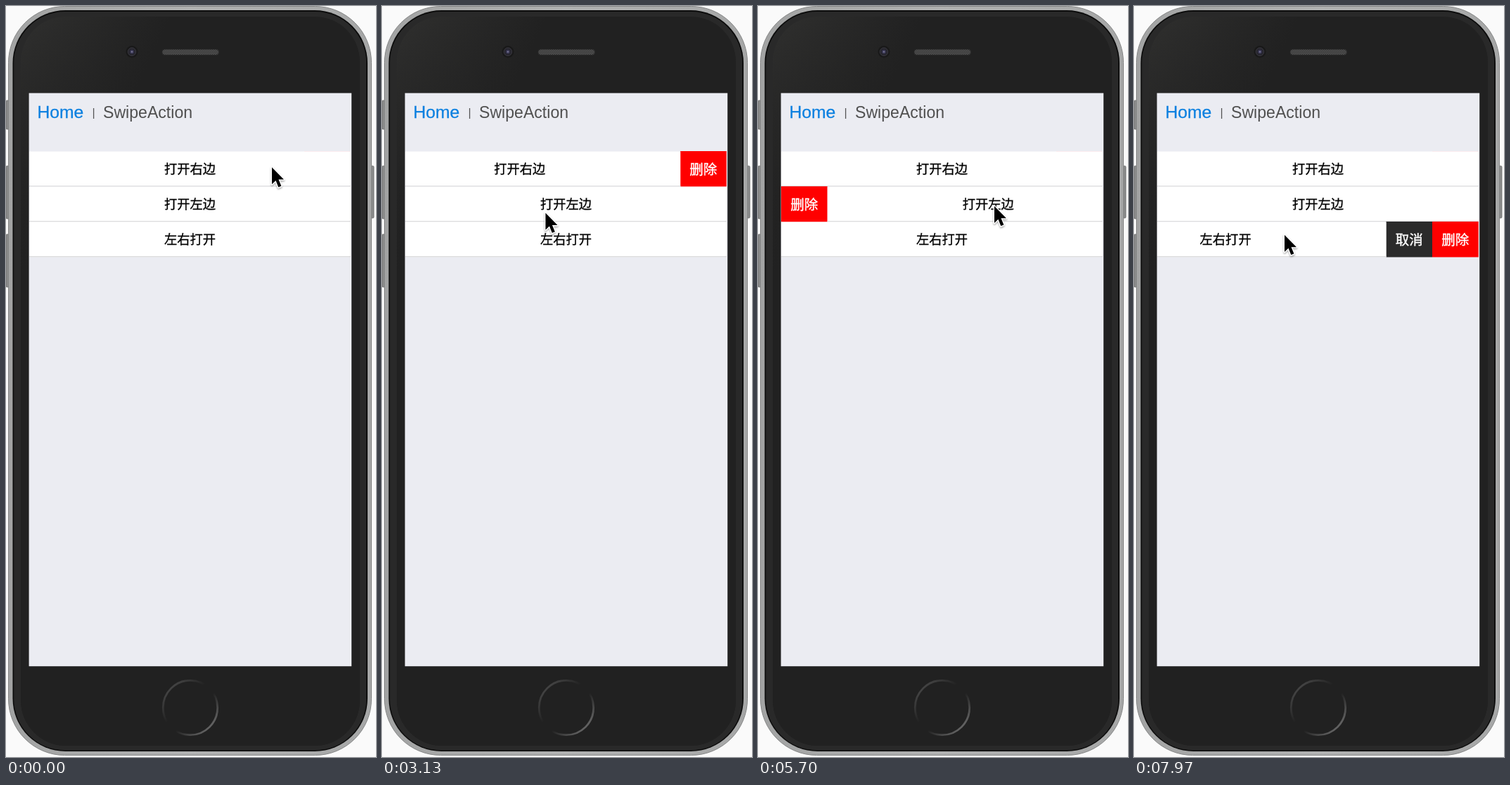
An HTML page for the animation above (8000 ms loop, 526 by 1066 pixels).

```html
<!DOCTYPE html>
<html lang="zh-CN">
<head>
<meta charset="utf-8">
<title>SwipeAction</title>
<style>
  html, body { margin: 0; width: 100%; height: 100%; overflow: hidden; background: #fafafa; }
  svg { display: block; width: 526px; height: 1066px; }
  .latin { font-family: "Liberation Sans", Arial, sans-serif; }
  .label, .button { font-family: "Noto Sans CJK SC", "Noto Sans CJK", sans-serif; text-anchor: middle; }
  .label { font-size: 18.3px; fill: #000; stroke: #000; stroke-width: .3; }
  .button { font-size: 19.5px; fill: #fff; stroke: #fff; stroke-width: .4; }
</style>
</head>
<body>
<svg viewBox="0 0 526 1066">
  <defs>
    <linearGradient id="metal">
      <stop offset="0" stop-color="#a2a3a3"/>
      <stop offset=".5" stop-color="#b0b1b1"/>
      <stop offset="1" stop-color="#a6a7a7"/>
    </linearGradient>
    <linearGradient id="sheen" gradientUnits="userSpaceOnUse" x1="20" y1="30" x2="190" y2="110">
      <stop offset="0" stop-color="#2f2f2e"/>
      <stop offset="1" stop-color="#212121"/>
    </linearGradient>
    <linearGradient id="fade" x2="0" y2="1">
      <stop offset="0" stop-color="#212121" stop-opacity="0"/>
      <stop offset=".35" stop-color="#212121"/>
    </linearGradient>
    <linearGradient id="ring" x1=".1" y1=".1" x2=".9" y2=".9">
      <stop offset="0" stop-color="#484848"/>
      <stop offset=".4" stop-color="#212121"/>
      <stop offset=".6" stop-color="#212121"/>
      <stop offset="1" stop-color="#6c6c6c"/>
    </linearGradient>
    <pattern id="mesh" width="3" height="3" patternUnits="userSpaceOnUse">
      <rect width="3" height="3" fill="#565656"/>
      <rect width="1.5" height="1.5" fill="#343434"/>
      <rect x="1.5" y="1.5" width="1.5" height="1.5" fill="#343434"/>
    </pattern>
    <filter id="shadow" x="-50%" y="-30%" width="200%" height="180%">
      <feDropShadow dx="0" dy="1.5" stdDeviation="1.3" flood-opacity=".4"/>
    </filter>
    <clipPath id="list"><rect x="33" y="206" width="457" height="151"/></clipPath>
  </defs>

  <rect width="526" height="1066" fill="#fafafa"/>
  <g fill="#8a8b8b" stroke="#6c6c6c" stroke-width=".8">
    <rect x="0" y="134" width="5" height="41" rx="1.5"/>
    <rect x="0" y="227" width="5" height="75" rx="1.5"/>
    <rect x="0" y="324" width="5" height="75" rx="1.5"/>
    <rect x="518" y="227" width="5" height="74" rx="1.5"/>
  </g>
  <rect x="3.5" y=".5" width="516" height="1063" rx="80" fill="url(#metal)" stroke="#858686"/>
  <rect x="9.5" y="6" width="504.5" height="1052" rx="75" fill="#0c0c0c"/>
  <rect x="11.2" y="8" width="501" height="1048.5" rx="73" fill="#292929"/>
  <rect x="21" y="15" width="482" height="1035" rx="64" fill="url(#sheen)"/>
  <rect x="21" y="15" width="482" height="1035" rx="64" fill="url(#fade)"/>

  <circle cx="179" cy="65" r="8.5" fill="#191919"/>
  <circle cx="179" cy="65" r="5.7" fill="#26252d" stroke="#39383f"/>
  <circle cx="179" cy="65" r="2.8" fill="#3b3958"/>
  <circle cx="179" cy="65" r="1.2" fill="#77758f"/>
  <rect x="222" y="61.5" width="80.5" height="8" rx="4" fill="url(#mesh)" stroke="#2c2c2c" stroke-width=".8"/>
  <circle cx="262" cy="996" r="38.7" fill="none" stroke="url(#ring)" stroke-width="2.8"/>

  <rect x="32.6" y="123.6" width="458.6" height="813.6" fill="#ebecf2"/>
  <g class="latin">
    <text x="44.5" y="158.5" font-size="24.7" fill="#0c80e0" stroke="#0c80e0" stroke-width=".3">Home</text>
    <text x="122.5" y="157" font-size="16" fill="#555">|</text>
    <text x="138" y="158.5" font-size="23.1" fill="#505050">SwipeAction</text>
  </g>
  <rect x="424" y="206" width="66" height="1" fill="#f8dadf"/>
  <g id="rows" clip-path="url(#list)"></g>
  <path id="cursor" d="M0 0V24L5.5 18.8 9.3 28.3 13.4 26.6 9.5 17.3H17Z"
    fill="#000" stroke="#fff" stroke-width="2.6" stroke-linejoin="round" paint-order="stroke" filter="url(#shadow)"/>
</svg>
<script>
const LOOP = 8000;
const LEFT = 33, RIGHT = 489.7, BUTTON = 65.7;
const rowsEl = document.getElementById('rows');
const cursorEl = document.getElementById('cursor');

// Drag: start time, pointer x at start, open offset, time the row closes.
const rows = [
  { text: '打开右边', start: 1740, from: 350, open: -BUTTON, close: 3400 },
  { text: '打开左边', start: 4250, from: 229, open: BUTTON, close: 5940 },
  { text: '左右打开', start: 6850, from: 347, open: -2 * BUTTON, close: Infinity }
];

// Pointer path: time, x, y.
const path = [
  [0, 378, 229], [800, 369, 228], [970, 352, 227], [1740, 350, 227],
  [2120, 247, 228], [2540, 247, 228], [2880, 237, 318], [3250, 231, 286],
  [3450, 230, 283], [3900, 229, 277], [4250, 229, 277], [4700, 343, 282],
  [5000, 336, 284], [5700, 336, 284], [5870, 335, 320], [6000, 336, 322],
  [6300, 342, 326], [6500, 342, 326], [6730, 347, 326], [6850, 347, 326],
  [7350, 214, 325], [LOOP, 214, 325]
];

const clamp = (v, lo, hi) => Math.min(hi, Math.max(lo, v));
const smooth = p => p * p * (3 - 2 * p);
const easeOut = p => 1 - (1 - p) ** 3;

function pointer(t) {
  const i = path.findIndex(k => k[0] > t);
  const [t0, x0, y0] = path[i - 1];
  const [t1, x1, y1] = path[i];
  const p = smooth((t - t0) / (t1 - t0));
  return { x: x0 + (x1 - x0) * p, y: y0 + (y1 - y0) * p };
}

function rowOffset(row, t, x) {
  if (t < row.start) return 0;
  if (t >= row.close) return row.open * (1 - easeOut(clamp((t - row.close) / 300, 0, 1)));
  return clamp(x - row.from, Math.min(row.open, 0), Math.max(row.open, 0));
}

function button(x, y, text, color) {
  return `<rect x="${x}" y="${y}" width="${BUTTON}" height="50.5" fill="${color}"/>
    <text class="button" x="${x + BUTTON / 2}" y="${y + 33.2}">${text}</text>`;
}

rowsEl.innerHTML = rows.map((row, i) => {
  const y = 206.5 + i * 50;
  const buttons = button(row.open > 0 ? LEFT : RIGHT - BUTTON, y - 0.5, '删除', '#f00') +
    (row.open < -BUTTON ? button(RIGHT - 2 * BUTTON, y - 0.5, '取消', '#2b2b2b') : '');
  return `<g class="actions">${buttons}</g><g class="content">
    <rect x="33" y="${y}" width="457" height="50" fill="#fff"/>
    <rect x="33" y="${y + 48.5}" width="457" height="1.5" fill="#dcdcde"/>
    <text class="label" x="261.5" y="${y + 31.5}">${row.text}</text></g>`;
}).join('');
const contents = rowsEl.querySelectorAll('.content');
const actions = rowsEl.querySelectorAll('.actions');

function draw(t) {
  const { x, y } = pointer(t);
  cursorEl.setAttribute('transform', `translate(${x} ${y})`);
  rows.forEach((row, i) => {
    const dx = rowOffset(row, t, x);
    contents[i].setAttribute('transform', `translate(${dx} 0)`);
    actions[i].setAttribute('visibility', Math.abs(dx) > 0.05 ? 'visible' : 'hidden');
  });
}

const begin = performance.now();
function tick() {
  draw((performance.now() - begin) % LOOP);
  requestAnimationFrame(tick);
}
draw(0);
requestAnimationFrame(tick);
</script>
</body>
</html>
```
